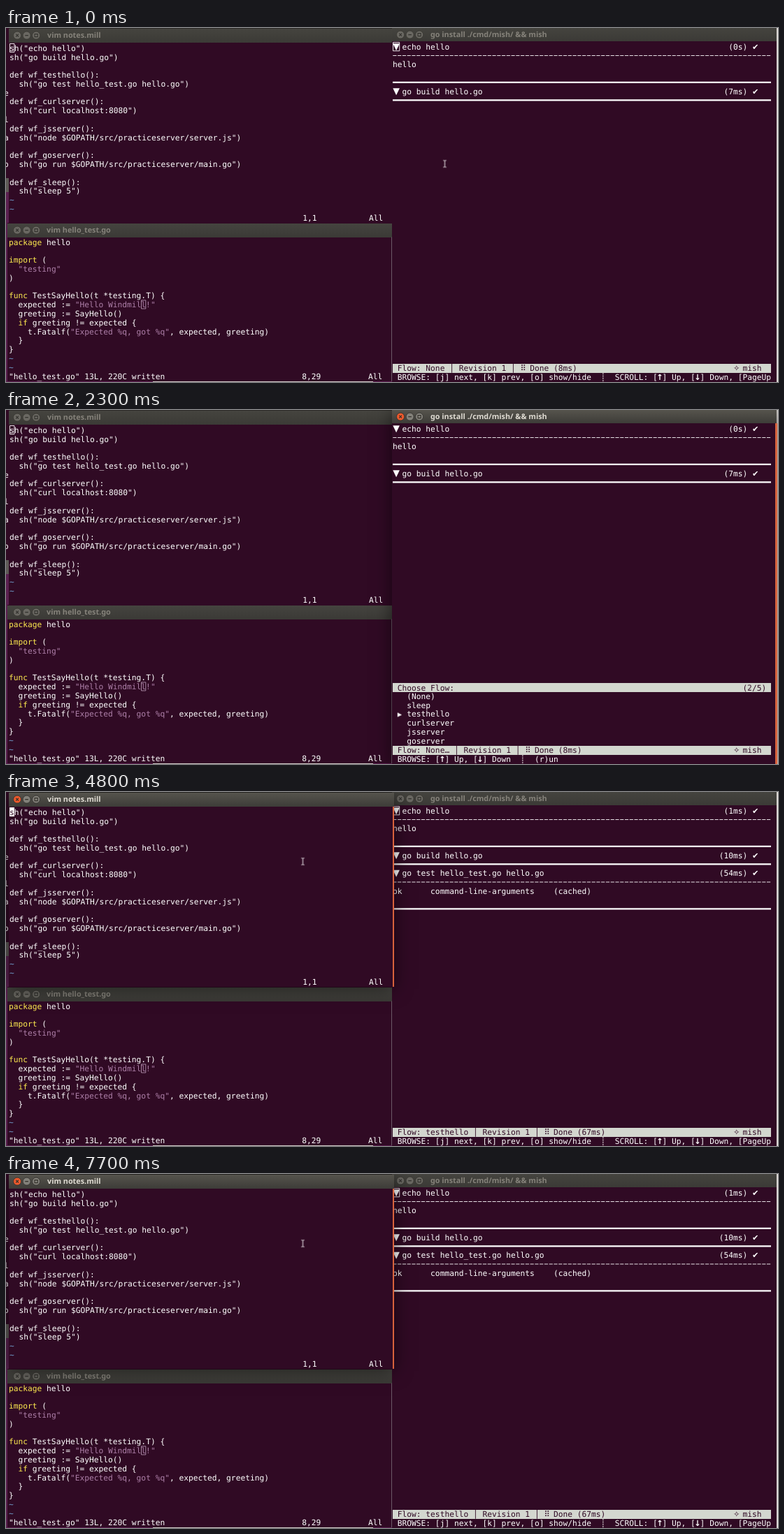
Recreate the animation shown at these times as an HTML page. Size 1104 by 507 pixels, loop 8000 ms.

```html
<!DOCTYPE html>
<html lang="en">
<head>
<meta charset="utf-8">
<title>Terminal workflow</title>
<style>
html, body { margin: 0; width: 100%; height: 100%; overflow: hidden; background: #300a24; }
#stage { position: relative; width: 1104px; height: 507px; overflow: hidden; background: #5a2050; }
#stage div, #stage svg, pre { position: absolute; }
svg { overflow: visible; left: 0; top: 0; }

/* terminal text: 9 x 17 cells, scaled down */
pre {
  margin: 0; color: #fff; white-space: pre;
  font: 14.95px/17px "DejaVu Sans Mono", monospace;
  text-rendering: geometricPrecision;
  transform: scale(.752); transform-origin: 0 0;
}
pre i {
  display: inline-block; width: 9px; height: 17px;
  font: normal 15px/17px "DejaVu Sans", sans-serif;
}
pre i.arrow { font-weight: bold; text-indent: -2px; }
.kw { color: #fce94f; }
.str { color: #ad7fa8; }
.nt { color: #729fcf; }
.ink { color: #300a24; }
.right { left: 552.5px; }

.term { background: #300a24; }
.strip { left: 553px; width: 541px; height: 12.8px; background: #d3d7cf; }
.bar { background: linear-gradient(#45443f, #3b3a36); height: 19px; }
.bar span {
  position: absolute; left: 55px; top: 0; line-height: 19px; white-space: pre;
  font: bold 10.8px/19px "Noto Sans", "Open Sans", sans-serif;
  text-rendering: geometricPrecision; color: #85827a;
}
.bar.lit { background: linear-gradient(#56544d, #3d3c38); }
.bar.lit span { color: #dfdbd2; }
.scroll { width: 2.6px; background: #d8623c; }
.shadow { box-shadow: 0 3px 24px rgba(0, 0, 0, .55); }

/* everything switches on one 8 s clock */
.k { animation: var(--k) 8s step-end infinite; }
@keyframes rightOn { 0% { opacity: 0 } 5% { opacity: 1 } 60%, 100% { opacity: 0 } }
@keyframes rightOff { 0% { opacity: 1 } 5% { opacity: 0 } 60%, 100% { opacity: 1 } }
@keyframes leftOn { 0% { opacity: 0 } 60%, 100% { opacity: 1 } }
@keyframes leftOff { 0% { opacity: 1 } 60%, 100% { opacity: 0 } }
@keyframes beforeMenu { 0% { opacity: 1 } 11.25%, 100% { opacity: 0 } }
@keyframes menu { 0% { opacity: 0 } 11.25% { opacity: 1 } 42.5%, 100% { opacity: 0 } }
@keyframes beforeRun { 0% { opacity: 1 } 42.5%, 100% { opacity: 0 } }
@keyframes afterRun { 0% { opacity: 0 } 42.5%, 100% { opacity: 1 } }
@keyframes helpLong { 0% { opacity: 1 } 11.25% { opacity: 0 } 42.5%, 100% { opacity: 1 } }
@keyframes pick { 0% { translate: 0 0 } 20% { translate: 0 12.784px } 22.5%, 100% { translate: 0 25.568px } }
@keyframes count { 0% { translate: 0 0 } 20% { translate: 0 -12.784px } 22.5%, 100% { translate: 0 -25.568px } }
@keyframes blinkRight {
  0% { opacity: 0 } 5% { opacity: 1 } 28.75% { opacity: 0 }
  45% { opacity: 1 } 55%, 100% { opacity: 0 }
}
@keyframes blinkLeft {
  0% { opacity: 0 } 60% { opacity: 1 } 67.5% { opacity: 0 } 76.25% { opacity: 1 }
  82.5% { opacity: 0 } 87.5% { opacity: 1 } 96.25%, 100% { opacity: 0 }
}
@keyframes mouse {
  0% { translate: 627.5px 194.5px; opacity: 1 }
  11.25% { translate: 627.5px 194.5px; opacity: 0 }
  42.5% { translate: 575.5px 175.5px; opacity: 1 }
  45% { translate: 500.5px 134.5px; opacity: 1 }
  46.25% { translate: 434.5px 99.5px; opacity: 1 }
  50% { translate: 429.5px 99.5px; opacity: 1 }
  51.25% { translate: 425.5px 99.5px; opacity: 1 }
  57.5%, 100% { translate: 424.5px 99.5px; opacity: 1 }
}
</style>
</head>
<body>
<svg width="0" height="0" style="position:absolute">
  <defs>
    <g id="signs" fill="none" stroke-width="1.1">
      <path d="M10.2 7.7l3.8 3.8m0-3.8l-3.8 3.8"/>
      <path d="M23.3 9.6h4.6M37 7.6h4.2v4h-4.2z"/>
    </g>
    <g id="dim">
      <g fill="#6a6862" stroke="#35342f" stroke-width=".7">
        <circle cx="12.1" cy="9.6" r="5.5"/><circle cx="25.6" cy="9.6" r="5.5"/><circle cx="39.1" cy="9.6" r="5.5"/>
      </g>
      <use href="#signs" stroke="#33322e"/>
    </g>
    <g id="bright">
      <g fill="#83817a" stroke="#2f2e2b" stroke-width=".8">
        <circle cx="12.1" cy="9.6" r="5.5" fill="#ee5a2d"/><circle cx="25.6" cy="9.6" r="5.5"/><circle cx="39.1" cy="9.6" r="5.5"/>
      </g>
      <use href="#signs" stroke="#33302b"/>
    </g>
    <path id="fold" d="M553.3 22.3h9.6l-4.8 10z"/>
    <path id="dashes" d="M553.3 39.5h540.7" stroke="#e6e1e5" stroke-dasharray="5.2 1.568"/>
    <path id="rule" d="M553 77.8h541" stroke="#fff" stroke-width="2.2"/>
  </defs>
</svg>

<div id="stage">
  <!-- desktop and window edges behind -->
  <div style="left:0;top:0;width:1104px;height:1px;background:#2b2926"></div>
  <div class="term" style="left:0;top:0;width:5px;height:215px;overflow:hidden">
    <pre style="left:-3px;top:86.5px">e


l


</pre>
    <pre style="left:-3px;top:151px">a


o</pre>
  </div>
  <div style="left:0;top:215px;width:5px;height:20px;background:#5d5a56"></div>
  <div style="left:210px;top:505px;width:315px;height:2px;background:#cfcac6"></div>
  <div style="left:1101px;top:0;width:3px;height:507px;background:linear-gradient(90deg,#77716f 33%,#dcd8d5 34%)"></div>

  <!-- notes window -->
  <div class="term" style="left:4px;top:1px;width:549px;height:277.5px"></div>
  <div class="bar" style="left:4px;top:1px;width:549px;height:20px">
    <svg width="50" height="19"><use href="#dim"/></svg><span>vim notes.mill</span>
  </div>
  <pre style="left:5.3px;top:22.8px">sh("echo hello")
sh("go build hello.go")

def wf_testhello():
  sh("go test hello_test.go hello.go")

def wf_curlserver():
  sh("curl localhost:8080")

def wf_jsserver():
  sh("node $GOPATH/src/practiceserver/server.js")

def wf_goserver():
  sh("go run $GOPATH/src/practiceserver/main.go")

def wf_sleep():
  sh("sleep 5")
<span class="nt">~
~</span>
                                                              1,1           All</pre>
  <svg width="1" height="1" class="k" style="--k:leftOff">
    <path d="M5.5 22.5h6.4v12.1h-6.4z" fill="none" stroke="#fff" stroke-width=".9"/>
  </svg>
  <div class="k" style="--k:blinkLeft;left:5px;top:22px;width:7px;height:13px;background:#fff">
    <pre class="ink" style="left:.3px;top:.8px">s</pre>
  </div>

  <!-- test file window -->
  <div class="term" style="left:2px;top:279px;width:550px;height:226.5px"></div>
  <div class="bar" style="left:2px;top:279.5px;width:550px;height:20px">
    <svg width="50" height="19"><use href="#dim" x="2"/></svg><span style="left:56px">vim hello_test.go</span>
  </div>
  <pre style="left:3.5px;top:300.6px"><span class="kw">package</span> hello

<span class="kw">import</span> (
  <span class="str">"testing"</span>
)

<span class="kw">func</span> TestSayHello(t *testing.T) {
  expected := <span class="str">"Hello Windmill!"</span>
  greeting := SayHello()
  <span class="kw">if</span> greeting != expected {
    t.Fatalf(<span class="str">"Expected %q, got %q"</span>, expected, greeting)
  }
}
<span class="nt">~
~</span>
"hello_test.go" 13L, 220C written                             8,29          All</pre>
  <svg width="1" height="1" fill="none">
    <path d="M193.5 389.9h6.3v12.1h-6.3z" stroke="#b594b0" stroke-width=".9"/>
    <path d="M551.6 299.5V506" stroke="#857a82" stroke-width=".8"/>
  </svg>

  <!-- runner window -->
  <div class="shadow k" style="--k:rightOn;left:552px;top:0;width:549px;height:507px"></div>
  <div class="term" style="left:552px;top:0;width:549.5px;height:507px"></div>
  <div class="bar" style="left:552px;top:0;width:550px">
    <svg width="50" height="19"><use href="#dim"/></svg><span>go install ./cmd/mish/ &amp;&amp; mish</span>
  </div>
  <div class="k" style="--k:rightOn;left:0;top:0">
    <div class="bar lit" style="left:552px;top:0;width:550px">
      <svg width="50" height="19"><use href="#bright"/></svg><span>go install ./cmd/mish/ &amp;&amp; mish</span>
    </div>
    <div class="scroll" style="left:1100.4px;top:19px;height:488px"></div>
  </div>

  <pre class="right" style="top:20.8px">  echo hello                                                                <i>✔</i>

hello


  go build hello.go                                                         <i>✔</i></pre>
  <svg width="1" height="1" fill="#fff">
    <use href="#fold"/><use href="#fold" y="63.9"/>
    <use href="#dashes"/><use href="#rule"/><use href="#rule" y="25.6"/>
  </svg>

  <pre class="right k" style="--k:beforeRun;top:20.8px">                                                                       (0s)




                                                                      (7ms)</pre>

  <div class="k" style="--k:afterRun;left:0;top:0">
    <pre class="right" style="top:20.8px">                                                                      (1ms)




                                                                     (10ms)

  go test hello_test.go hello.go                                     (54ms) <i>✔</i>

ok      command-line-arguments    (cached)</pre>
    <svg width="1" height="1" fill="#fff">
      <use href="#fold" y="89.5"/><use href="#dashes" y="89.5"/><use href="#rule" y="89.5"/>
    </svg>
  </div>

  <svg width="1" height="1" class="k" style="--k:rightOff">
    <path d="M553.5 20.6h9.2v12.2h-9.2z" fill="none" stroke="#fff" stroke-width=".9"/>
  </svg>
  <svg width="1" height="1" class="k" style="--k:blinkRight">
    <path d="M553 20.1h10v12.9h-10z" fill="#fff"/><use href="#fold" fill="#300a24"/>
  </svg>

  <!-- flow chooser -->
  <div class="k" style="--k:menu;left:0;top:0">
    <div class="strip" style="top:391.2px"></div>
    <pre class="right ink" style="top:391.5px"> Choose Flow:                                                             ( /5)</pre>
    <div style="left:1060.1px;top:391.5px;width:7px;height:12.5px;overflow:hidden">
      <pre class="ink k" style="--k:count;left:0;top:0">0
1
2</pre>
    </div>
    <pre class="right" style="top:404.3px">   (None)
   sleep
   testhello
   curlserver
   jsserver
   goserver</pre>
    <svg width="1" height="1" class="k" style="--k:pick">
      <path d="M559.8 407.7l6.4 3.2l-6.4 3.2z" fill="#fff"/>
    </svg>
  </div>

  <!-- status and help -->
  <div class="strip" style="top:480.8px"></div>
  <pre class="right ink k" style="--k:beforeMenu;top:481px"> Flow: None │ Revision 1 │ <i>⠿</i> Done (8ms)</pre>
  <pre class="right ink k" style="--k:menu;top:481px"> Flow: None… │ Revision 1 │ <i>⠿</i> Done (8ms)</pre>
  <pre class="right ink k" style="--k:afterRun;top:481px"> Flow: testhello │ Revision 1 │ <i>⠿</i> Done (67ms)</pre>
  <pre class="right ink" style="top:481px">                                                                        <i>✧</i> mish</pre>
  <pre class="right k" style="--k:helpLong;top:493.8px"> BROWSE: [j] next, [k] prev, [o] show/hide  ┊  SCROLL: [<i class="arrow">↑</i>] Up, [<i class="arrow">↓</i>] Down, [PageUp</pre>
  <pre class="right k" style="--k:menu;top:493.8px"> BROWSE: [<i class="arrow">↑</i>] Up, [<i class="arrow">↓</i>] Down  ┊  (r)un</pre>

  <!-- notes window raised -->
  <div class="k" style="--k:leftOn;left:0;top:0">
    <div class="shadow" style="left:4px;top:1px;width:551px;height:277.5px"></div>
    <div class="bar lit" style="left:4px;top:1px;width:551px;height:20px">
      <svg width="50" height="19"><use href="#bright"/></svg><span>vim notes.mill</span>
    </div>
    <div class="scroll" style="left:552.5px;top:21px;height:257.5px"></div>
  </div>

  <svg width="1" height="1" class="k" style="--k:mouse">
    <path d="M-2.2-4.8h1.6l.6.6l.6-.6h1.6M0-4.2V4.2M-2.2 4.8h1.6l.6-.6l.6.6h1.6" fill="none" stroke="#f4f0f3"/>
  </svg>
</div>
</body>
</html>
```
